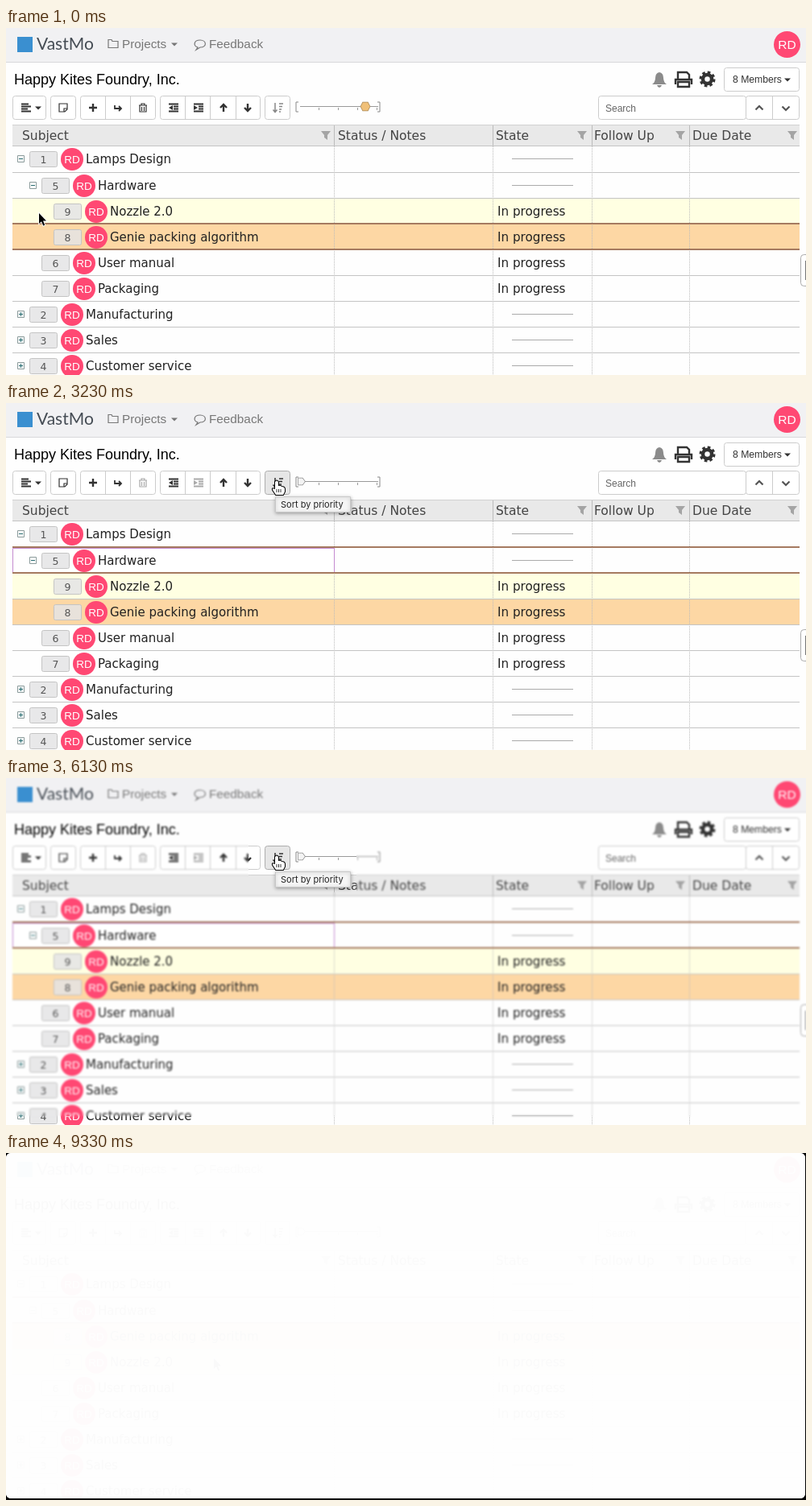
These frames come from a looping animation (993 by 431 pixels, 9360 ms). An HTML page with a canvas:

```html
<!DOCTYPE html>
<html lang="en">
<head>
<meta charset="utf-8">
<title>Sort by priority</title>
<style>
  html, body { margin: 0; width: 100%; height: 100%; overflow: hidden; background: #fff; }
  canvas { display: block; }
</style>
</head>
<body>
<canvas id="stage" width="993" height="431"></canvas>
<script>
const W = 993, H = 431, LOOP = 9360, PAD = 30;
const SANS = '"Liberation Sans", Arial, sans-serif';
const TABLE = '"DejaVu Sans", Verdana, sans-serif';
const DARK = '#333', PALE = '#aaa', PINK = '#ff4873';

// The scene has a margin so that its blurred copy keeps solid edges.
const out = document.getElementById('stage').getContext('2d');
const scene = document.createElement('canvas');
scene.width = W + 2 * PAD;
scene.height = H + 2 * PAD;
const c = scene.getContext('2d');
c.translate(PAD, PAD);

const clamp = v => Math.max(0, Math.min(1, v));
const ramp = (t, from, to) => clamp((t - from) / (to - from));

function rect(x, y, w, h, color) {
  c.fillStyle = color;
  c.fillRect(x, y, w, h);
}
function box(x, y, w, h, r, fill, border) {
  c.beginPath();
  c.roundRect(x + .5, y + .5, w, h, r);
  c.fillStyle = fill;
  c.fill();
  c.lineWidth = 1;
  c.strokeStyle = border;
  c.stroke();
}
function text(s, x, y, size, color = '#222', family = SANS, align = 'left') {
  c.font = `${size}px ${family}`;
  c.fillStyle = color;
  c.textAlign = align;
  c.fillText(s, x, y);
}
function shape(d, x, y, fill, stroke, width = 2) {
  c.save();
  c.translate(x, y);
  const path = new Path2D(d);
  if (stroke) {
    c.strokeStyle = stroke;
    c.lineWidth = width;
    c.stroke(path);
  }
  if (fill) {
    c.fillStyle = fill;
    c.fill(path);
  }
  c.restore();
}
const line = (d, x, y, color = DARK, width = 2) => shape(d, x, y, null, color, width);
const caret = (x, y, color = DARK) => shape('M-4-2H4L0 2Z', x, y, color);

function avatar(x, y, r, size) {
  c.beginPath();
  c.arc(x, y, r, 0, 7);
  c.fillStyle = PINK;
  c.fill();
  text('RD', x, y + size * .36, size, '#fff', SANS, 'center');
}

// start, end, from, control point, to
const moves = [
  [530, 960, 41, 230, 52, 208, 36, 187],
  [1130, 1360, 36, 187, 80, 190, 123, 184],
  [2100, 3030, 123, 184, 257, 206, 336, 97],
  [7460, 8060, 336, 97, 305, 200, 258, 255]
];
function cursorAt(t) {
  const [start, end, x0, y0, cx, cy, x1, y1] = moves.findLast(m => t >= m[0]) || moves[0];
  const p = ramp(t, start, end), s = p * p * (3 - 2 * p);
  const bend = (a, b, d) => (1 - s) ** 2 * a + 2 * s * (1 - s) * b + s * s * d;
  return [bend(x0, cx, x1), bend(y0, cy, y1)];
}

function drawHeader() {
  rect(-PAD, -PAD, W + 2 * PAD, PAD + 42, '#f1f1f3');
  rect(-PAD, 42, W + 2 * PAD, 1, '#d8d8da');
  rect(14, 11, 19, 19, '#3a8fd0');
  text('VastMo', 38, 27, 21, '#454c54', 'Lato, sans-serif');
  line('M-6-5H-2L-1-3H6V5H-6Z', 133, 19.5, '#777', 1.2);
  text('Projects', 144, 25, 15.3, '#777');
  caret(209, 20.5, '#777');
  line('M-3 4C-9 2-8-5 0-5S9 4 0 4L-5 7Z', 241, 20, '#777', 1.2);
  text('Feedback', 252, 25, 15.3, '#777');
  avatar(969.5, 20.5, 16.5, 15.5);

  text('Happy Kites Foundry, Inc.', 10, 70, 18, '#000');
  shape('M-9 6Q-5 3-5-2Q-5-8 0-9Q5-8 5-2Q5 3 9 6ZM-3 7H3Q2 10 0 10T-3 7Z', 811, 64, '#8b8b8b');
  line('M-7 0V-9H4L7-6V0M-10 6V0H10V6M-7 3H7V9H-7Z', 841, 64, DARK, 2.4);
  c.setLineDash([3.4, 2.88]);
  line('M8 0A8 8 0 1 1-8 0A8 8 0 1 1 8 0', 870.5, 63.5, DARK, 4);
  c.setLineDash([]);
  line('M5.5 0A5.5 5.5 0 1 1-5.5 0A5.5 5.5 0 1 1 5.5 0', 870.5, 63.5, DARK, 4.5);
  box(891, 49, 93, 29, 3, '#fff', '#ccc');
  text('8 Members', 902, 68, 12.2, DARK);
  caret(970, 64.5);
}

function drawToolbar(picked, hover) {
  for (const [x, w] of [[8, 41], [55, 31], [92, 93], [191, 124]]) box(x, 84, w, 29, 3, '#fff', '#ccc');
  for (const x of [123, 154, 222, 253, 285]) rect(x, 85, 1, 28, '#ccc');
  box(321, 84, 31, 29, 3, hover ? '#e6e6e6' : '#fff', hover ? '#adadad' : '#ccc');

  const limited = picked ? PALE : DARK;
  line('M-6-4H3M-6-1H6M-6 2H2M-6 5H6', 25, 98.5, DARK, 1.8);
  caret(40, 99.5);
  line('M-5-5H5V2L2 5H-5ZM5 1H1V5', 71, 99, DARK, 1.2);
  line('M-5 0H5M0-5V5', 108, 99, DARK, 2.4);
  line('M-4-3V1H4M1-2L4 1L1 4', 139, 99, DARK, 1.8);
  line('M-5-3H5M-2-3V-5H2V-3M-4-3V5H4V-3M-1.5-1V4M1.5-1V4', 170, 99, limited, 1.2);
  const lines = 'M-6-4.5H6M0-1.5H6M0 1.5H6M-6 4.5H6';
  line(lines, 208, 99, DARK, 2.2);
  shape('M-1-3V3L-6 0Z', 208, 99, DARK);
  line(lines, 239, 99, limited, 2.2);
  shape('M-6-3V3L-1 0Z', 239, 99, limited);
  line('M0 5V-4M-4 0L0-4L4 0', 270, 99, DARK, 2.4);
  line('M0-5V4M-4 0L0 4L4 0', 300, 99, DARK, 2.4);
  const sort = picked ? DARK : '#888';
  line('M-4-6V5M-6.5 2.5L-4 5.5L-1.5 2.5M1-5H6M1-1.5H5M1 2H4M1 5H3', 338, 99, sort, 1.5);

  line('M4-6H1V6H4M102-6H105V6H102', 359, 98, '#888', 1);
  line('M365 97.5H462M388.5 99V102M412.5 99V102M436.5 99V102M460.5 99V102', 0, 0, '#999', 1);
  if (picked) shape('M-3-4H2L5 0L2 4H-3Z', 366, 97.5, '#f4f4f4', '#888', 1.4);
  else shape('M-3-5H3L5.5 0L3 5H-3L-5.5 0Z', 446, 97.5, '#f0c078', '#a88858', 1.5);

  box(735, 84, 183, 29, 3, '#fff', '#ccc');
  text('Search', 744, 104, 12, '#666');
  box(918, 84, 66, 29, 3, '#fff', '#ccc');
  rect(951, 85, 1, 28, '#ccc');
  line('M-4.5 2L0-2.5L4.5 2', 935, 99.5, '#555', 2.2);
  line('M-4.5-2L0 2.5L4.5-2', 968, 99.5, '#555', 2.2);
}

// number, title, level, toggle, background ('' toggle: a task in progress)
const YELLOW = '#ffffe2', ORANGE = '#fdd7a4';
const rows = [
  [1, 'Lamps Design', 0, '-'], [5, 'Hardware', 1, '-'],
  [9, 'Nozzle 2.0', 2, '', YELLOW], [8, 'Genie packing algorithm', 2, '', ORANGE],
  [6, 'User manual', 1, ''], [7, 'Packaging', 1, ''],
  [2, 'Manufacturing', 0, '+'], [3, 'Sales', 0, '+'], [4, 'Customer service', 0, '+']
];
const columns = [['Subject', 20, 397], ['Status / Notes', 412], ['State', 608, 715],
  ['Follow Up', 730, 837], ['Due Date', 852, 976]];
const edges = [407, 604, 727, 848];

function drawRow([number, title, level, toggle, fill], i, editing) {
  // The first row sits one pixel higher, right under the header.
  const top = 147 + 32 * i, mid = top + (i ? 17 : 16), x = level * 15;
  if (fill) rect(8, top + 1, 977, 31, fill);
  rect(8, top + 32, 977, 1, '#c4c4c4');
  if (editing) box(8, top + 1, 399, 30, 0, '#fff', '#c58bd0');
  if (toggle) {
    box(14 + x, mid - 5, 8, 8, 0, '#fff', '#8a9a9a');
    line('M-2.5 0H2.5' + (toggle == '+' ? 'M0-2.5V2.5' : ''), 18.5 + x, mid - .5, '#276b70', 1);
  }
  box(29 + x, mid - 10, 34, 19, 2, 'rgba(228,228,230,.85)', '#c4c4c4');
  text(number, 46.5 + x, mid + 5, 12.5, '#555', TABLE, 'center');
  avatar(82 + x, mid, 14, 13.5);
  text(title, 99 + x, mid + 5, 15, '#222', TABLE);
  if (toggle) rect(628, mid - 1, 76, 1, '#aaa');
  else text('In progress', 610, mid + 5, 15.2, '#222', TABLE);
}

function drawTable(picked, swapped, editing) {
  const order = swapped ? [0, 1, 3, 2, 4, 5, 6, 7, 8] : rows.keys();
  [...order].forEach((row, i) => drawRow(rows[row], i, editing && i == 1));
  c.setLineDash([1, 1]);
  for (const x of edges) line(`M${x}.5 147V431`, 0, 0, '#bbb', 1);
  c.setLineDash([]);
  if (editing) rect(407, 180, 1, 31, '#c58bd0');

  const top = picked ? 178 : 242;
  for (const y of [top, top + 32]) rect(8, y, 977, 2, '#a57a60');

  rect(8, 121, 977, 25, '#e9e9e9');
  rect(8, 120, 977, 1, '#d2d2d2');
  rect(8, 146, 977, 1, '#c4c4c4');
  for (const x of edges) rect(x, 121, 1, 25, '#bbb');
  for (const [label, x, funnel] of columns) {
    text(label, x, 139, 15.5, '#444', TABLE);
    if (funnel) shape('M-6-5H6L2 0V6L-2 3V0Z', funnel, 133, '#a4a4a4');
  }
  box(986, 281, 14, 39, 4, '#fff', '#aaa');
  rect(992, 289, 1, 24, '#777');
}

function drawRipple(t, start, x, y) {
  const p = (t - start) / 960;
  if (p <= 0 || p >= 1) return;
  const r = 28 * p, glow = c.createRadialGradient(x, y, 0, x, y, r);
  glow.addColorStop(0, 'rgba(255,255,255,.95)');
  glow.addColorStop(.6, 'rgba(248,245,244,.95)');
  glow.addColorStop(1, 'rgba(165,155,155,.7)');
  c.globalAlpha = Math.min(1, 1.8 * (1 - p));
  c.beginPath();
  c.arc(x, y, r, 0, 7);
  c.fillStyle = glow;
  c.fill();
  c.globalAlpha = 1;
}

function drawCursor(x, y, hand) {
  if (hand) {
    shape('M-2 1Q0-2 2 1V6Q5 5 6 7Q10 7 10 10V13L8 17H-1L-5 11Q-6 8-2 10Z', x, y, '#fff', '#000', 2);
    line('M2.5 10V14M5 10V14M0 10V14', x, y, '#000', .8);
  } else {
    shape('M0 0V13L3 10.3L5.2 15.6L7.2 14.7L5 9.6H9Z', x, y, '#000', '#fff', 1.6);
  }
}

function drawScene(t) {
  const picked = t >= 1760, swapped = t >= 6800, editing = picked && !swapped;
  const [x, y] = cursorAt(t), hover = x > 321 && y < 114;
  rect(-PAD, -PAD, W + 2 * PAD, H + 2 * PAD, '#fefefe');
  drawHeader();
  drawToolbar(picked, hover);
  drawTable(picked, swapped, editing);
  if (editing && t < 2300) rect(187, 187, 1, 16, '#000');
  if (t >= 3230 && t < 6560) {
    c.shadowColor = 'rgba(0,0,0,.3)';
    c.shadowBlur = 4;
    c.shadowOffsetY = 1;
    box(334, 116, 93, 19, 0, '#f6f6f6', '#c8c8c8');
    c.shadowColor = 'transparent';
    text('Sort by priority', 341, 130, 11, '#222', 'Inter, sans-serif');
  }
  drawRipple(t, 1700, 126, 191);
  drawRipple(t, 6530, 336, 107);
  drawCursor(x, y, hover);
}

function render(t) {
  drawScene(t);
  out.drawImage(scene, -PAD, -PAD);

  const blur = 6 * (ramp(t, 3230, 3730) - ramp(t, 5760, 6230));
  if (blur > 0) {
    const w = W + 2 * PAD, h = 420 + PAD;
    out.filter = `blur(${blur}px)`;
    out.drawImage(scene, 0, 0, w, h, -PAD, -PAD, w, h);
    out.filter = 'none';
    out.drawImage(scene, PAD + 301, PAD + 82, 134, 60, 301, 82, 134, 60);
  }

  // Fade to a white card with rounded corners on black.
  const fade = .98 * ramp(t, 8360, 9260);
  if (fade > 0) {
    const card = new Path2D(), around = new Path2D();
    card.roundRect(0, 0, W - 1, H - 2, 6);
    around.rect(0, 0, W, H);
    around.addPath(card);
    out.globalAlpha = fade;
    out.fillStyle = '#000';
    out.fill(around, 'evenodd');
    out.fillStyle = '#fefefe';
    out.fill(card);
    out.globalAlpha = 1;
  }
}

const began = performance.now();
function tick() {
  render((performance.now() - began) % LOOP);
  requestAnimationFrame(tick);
}
tick();
</script>
</body>
</html>
```
